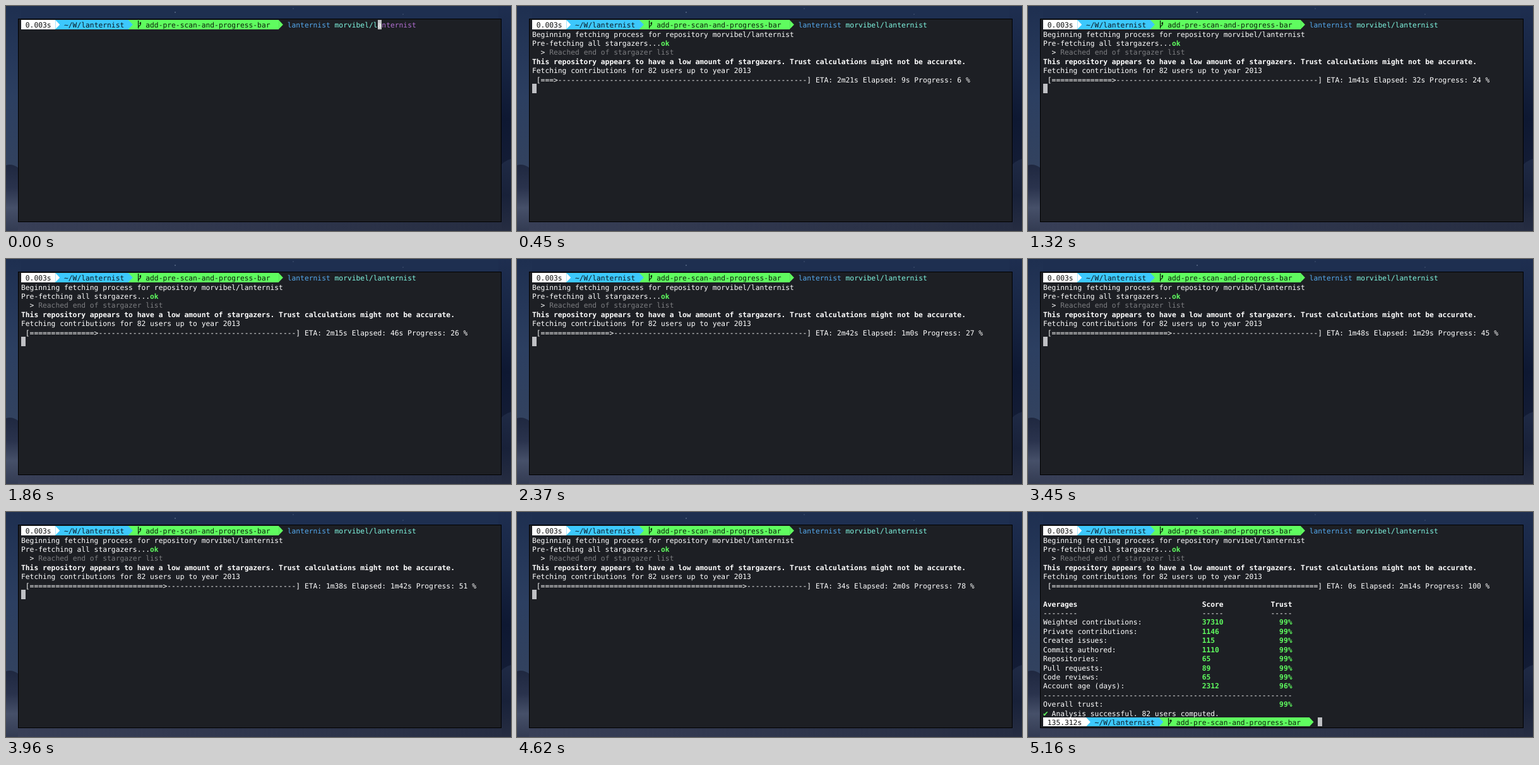
An HTML page that plays this animation: 800x356 px, repeating every 6820 ms.

```html
<!DOCTYPE html>
<html lang="en">
<head>
<meta charset="utf-8">
<title>Terminal session</title>
<style>
html, body { margin: 0; width: 100%; height: 100%; overflow: hidden; }
body { position: relative; background: #1c2b48; }
#wall { position: absolute; left: 0; top: 0; }
#term {
  position: absolute; left: 19px; top: 20px; width: 766px; height: 322px;
  box-sizing: border-box; padding: 1.2px 0 0 4px; overflow: hidden;
  background: #1d1f24; border: 1px solid #000;
  color: #fff; font: 11.3px/17px "DejaVu Sans Mono", monospace;
  text-rendering: geometricPrecision; font-variant-ligatures: none;
}
.row { display: flex; height: 14.43px; white-space: pre; }
.row b { font-weight: 700; }
.time { background: #fff; color: #111; }
.path { background: #3cc8fd; color: #0b1a22; }
.branch { background: #5ffc5f; color: #0b220b; }
.tip { width: 1ch; }
.tip::before {
  content: ""; display: block; height: 100%; background: var(--from);
  clip-path: polygon(0 0, 100% 50%, 0 100%);
}
.fork { width: 1ch; height: 100%; background: #5ffc5f; }
.command { color: #55aaf0; }
.arg { color: #80f7e2; }
.hint { color: #b26fd2; }
.dim { color: #7c7d80; }
.row .ok { color: #5ffc5f; }
.cursor { background: #bfc0c4; color: #f6f6f6; width: 1ch; }
.check { width: 13.6px; color: #5ffc5f; font-size: 13px; }
</style>
</head>
<body>
<svg id="wall" width="800" height="356">
  <defs>
    <linearGradient id="west" x2="0" y2="1">
      <stop offset="0" stop-color="#1e2f50"/>
      <stop offset=".4" stop-color="#2c3f61"/>
      <stop offset=".7" stop-color="#32425f"/>
    </linearGradient>
    <linearGradient id="east" x2="0" y2="1">
      <stop offset="0" stop-color="#1e2e50"/>
      <stop offset=".25" stop-color="#172543"/>
      <stop offset=".5" stop-color="#0e1832"/>
      <stop offset=".7" stop-color="#131c35"/>
    </linearGradient>
    <linearGradient id="westDune" x2="0" y2="1">
      <stop offset="0" stop-color="#1f2840"/>
      <stop offset=".35" stop-color="#2a334d"/>
      <stop offset=".65" stop-color="#465069"/>
      <stop offset="1" stop-color="#333b52"/>
    </linearGradient>
    <linearGradient id="eastDune" x2="0" y2="1">
      <stop offset="0" stop-color="#1f2a45"/>
      <stop offset=".5" stop-color="#182139"/>
      <stop offset="1" stop-color="#262d42"/>
    </linearGradient>
    <linearGradient id="sand">
      <stop offset="0" stop-color="#383f57"/>
      <stop offset="1" stop-color="#262d42"/>
    </linearGradient>
  </defs>
  <rect width="800" height="24" fill="#1e2f50"/>
  <rect width="24" height="356" fill="url(#west)"/>
  <rect x="780" width="20" height="356" fill="url(#east)"/>
  <path d="M0 252Q12 248 24 260V356H0Z" fill="url(#westDune)"/>
  <path d="M780 256Q790 244 800 242V356H780Z" fill="url(#eastDune)"/>
  <rect x="19" y="340" width="766" height="16" fill="url(#sand)"/>
  <g fill="#8291ad"><circle cx="268" cy="10" r=".8"/><circle cx="455" cy="4" r=".5"/><circle cx="629" cy="13" r=".5"/></g>
</svg>
<div id="term"></div>
<script>
const LOOP = 6820, STEP = 30, DONE = 5160, USERS = 82, BAR = 62;
const TOOL = "lanternist", OWNER = "morvibel", REPO = `${OWNER}/${TOOL}`;
const term = document.getElementById("term");

// [animation ms, elapsed seconds, users fetched]
const PROGRESS = [[90, 0, 0], [450, 9.15, 5], [1320, 32.45, 20], [2370, 59.55, 22],
  [2910, 74.2, 32], [3960, 102.43, 42], [DONE, 134.3, USERS]];

const AVERAGES = [["Weighted contributions", 37310, 99], ["Private contributions", 1146, 99],
  ["Created issues", 115, 99], ["Commits authored", 1110, 99], ["Repositories", 65, 99],
  ["Pull requests", 89, 99], ["Code reviews", 65, 99], ["Account age (days)", 2312, 96]];

const span = (cls, text = "") => `<span class="${cls}">${text}</span>`;
const bold = (text, cls = "") => `<b class="${cls}">${text}</b>`;
const plain = text => span("", text);
const tip = (from, to) => `<span class="tip" style="--from:${from};background:${to}"></span>`;
const cursor = (text = "") => span("cursor", text);

const FORK = `<svg class="fork" viewBox="0 0 6.8 14.4" fill="none" stroke="#0b220b" stroke-width="1.3">
  <path d="M1.6 1V13.6M5.2 4.5V7Q5 8.6 1.6 10.6M3.7 6L5.2 4L6.6 6"/></svg>`;

const prompt = time => span("time", ` ${time} `) + tip("#fff", "#3cc8fd") +
  span("path", ` ~/W/${TOOL} `) + tip("#3cc8fd", "#5ffc5f") +
  span("branch", " ") + FORK + span("branch", " add-pre-scan-and-progress-bar  ") +
  tip("#5ffc5f", "transparent") + plain(" ");

function duration(seconds) {
  const s = Math.round(seconds);
  return s < 60 ? `${s}s` : `${Math.floor(s / 60)}m${s % 60}s`;
}

function progressAt(t) {
  const i = Math.max(1, PROGRESS.findIndex(p => p[0] >= t));
  const [t0, e0, n0] = PROGRESS[i - 1], [t1, e1, n1] = PROGRESS[i];
  const k = (t - t0) / (t1 - t0);
  return [e0 + (e1 - e0) * k, Math.floor(n0 + (n1 - n0) * k + 1e-6)];
}

function progressBar(t) {
  const [elapsed, users] = progressAt(t);
  const ratio = users / USERS;
  const filled = Math.max(0, Math.round(BAR * ratio) - 1);
  const bar = ratio === 1 ? "=".repeat(BAR)
    : "=".repeat(filled) + "&gt;" + "-".repeat(BAR - filled - 1);
  const eta = users ? elapsed * (USERS - users) / users : 0;
  return plain(` [${bar}] ETA: ${duration(eta)} Elapsed: ${duration(elapsed)} Progress: ${Math.round(ratio * 100)} %`);
}

const report = () => [
  "",
  bold("Averages".padEnd(37) + "Score".padEnd(16) + "Trust"),
  plain("--------".padEnd(37) + "-----".padEnd(16) + "-----"),
  ...AVERAGES.map(([label, score, trust]) =>
    plain(`${label}:`.padEnd(37)) + bold(String(score).padEnd(18) + trust + "%", "ok")),
  plain("-".repeat(58)),
  plain("Overall trust:".padEnd(55)) + bold("99%", "ok"),
  span("check", "✔") + plain(`Analysis successful. ${USERS} users computed.`),
  prompt("135.312s") + cursor(),
];

function rowsAt(t) {
  const start = prompt("0.003s") + span("command", TOOL) + plain(" ");
  if (t < STEP) {
    const at = OWNER.length + 2;
    return [start + span("arg", REPO.slice(0, at)) + cursor(REPO[at]) + span("hint", REPO.slice(at + 1))];
  }
  const rows = [start + span("arg", REPO)];
  if (t < 2 * STEP) return [...rows, cursor()];
  rows.push(plain(`Beginning fetching process for repository ${REPO}`));
  const prefetch = plain("Pre-fetching all stargazers...");
  if (t < 3 * STEP) return [...rows, prefetch, cursor()];
  rows.push(
    prefetch + bold("ok", "ok"),
    plain("  &gt; ") + span("dim", "Reached end of stargazer list"),
    bold("This repository appears to have a low amount of stargazers. Trust calculations might not be accurate."),
    plain(`Fetching contributions for ${USERS} users up to year 2013`),
    progressBar(t));
  return rows.concat(t < DONE ? cursor() : report());
}

const origin = performance.now();
let shown = -1;
function draw() {
  const now = (performance.now() - origin) % LOOP;
  const t = Math.min(DONE, Math.floor(now / STEP) * STEP);
  if (t !== shown) {
    shown = t;
    term.innerHTML = rowsAt(t).map(row => `<div class="row">${row}</div>`).join("");
  }
  requestAnimationFrame(draw);
}
draw();
</script>
</body>
</html>
```
